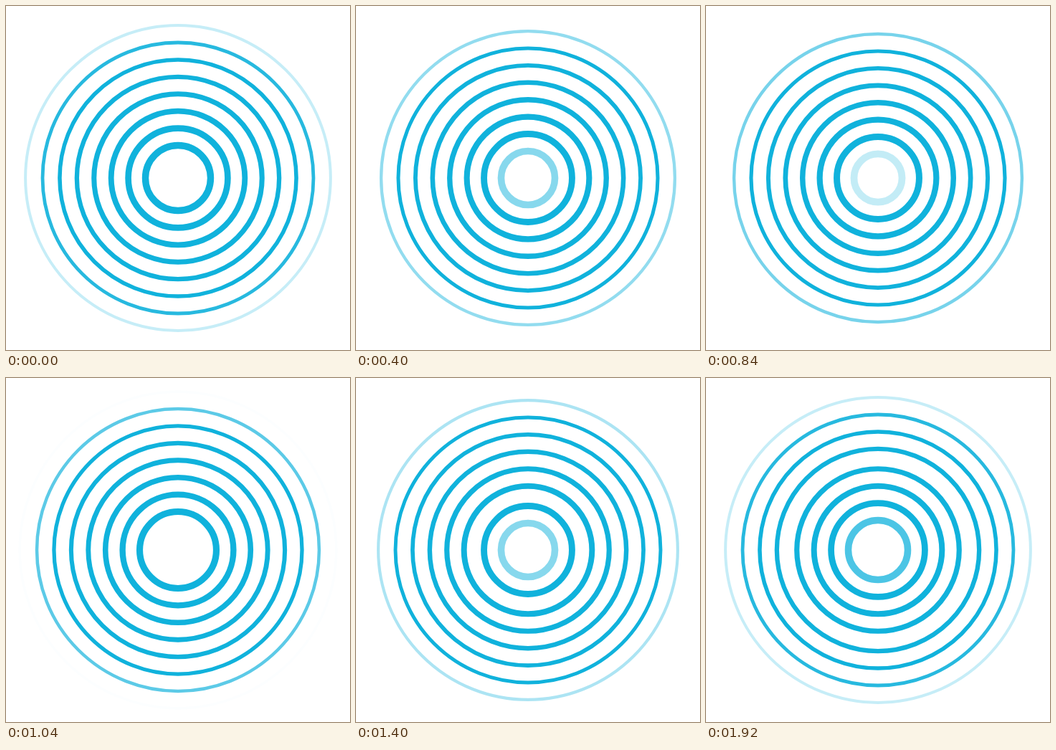
Recreate the animation shown at these times as an HTML page without scripts. Size 480 px wide and 480 px high, loop 1.96 s.

```html
<!DOCTYPE html>
<html lang="en">
<head>
<meta charset="utf-8">
<title>Ripples</title>
<style>
@property --t {
  syntax: "<integer>";
  inherits: true;
  initial-value: 0;
}
html, body {
  margin: 0;
  height: 100%;
  overflow: hidden;
  background: #fff;
}
svg {
  display: block;
  width: 100vw;
  height: 100vh;
  /* one shared clock, 40 ms per tick; the tiny lead keeps ticks on time */
  animation: clock 1960ms steps(49, end) -2ms infinite;
}
@keyframes clock {
  from { --t: 0; }
  to { --t: 49; }
}
circle {
  /* age in ticks since birth --b, wrapped to the ring's life --n */
  --x: calc(var(--t) - var(--b));
  --age: calc(var(--x) + var(--n) * clamp(0, 0 - var(--x), 1));
  r: calc(29.55px + var(--age) * 3.986px);
  stroke-width: calc(9.9px - var(--age) * 0.128px);
  opacity: min(var(--age) / 4, (48.1 - var(--age)) / 9, 1);
  fill: none;
  stroke: #10b2dc;
}
.early { --n: 48; }
.late { --n: 49; }
</style>
</head>
<body>
<svg viewBox="0 0 480 480">
  <g class="early">
    <circle cx="240" cy="240" style="--b:2"/>
    <circle cx="240" cy="240" style="--b:8"/>
    <circle cx="240" cy="240" style="--b:14"/>
    <circle cx="240" cy="240" style="--b:20"/>
  </g>
  <g class="late">
    <circle cx="240" cy="240" style="--b:27"/>
    <circle cx="240" cy="240" style="--b:33"/>
    <circle cx="240" cy="240" style="--b:39"/>
    <circle cx="240" cy="240" style="--b:45"/>
  </g>
</svg>
</body>
</html>
```
